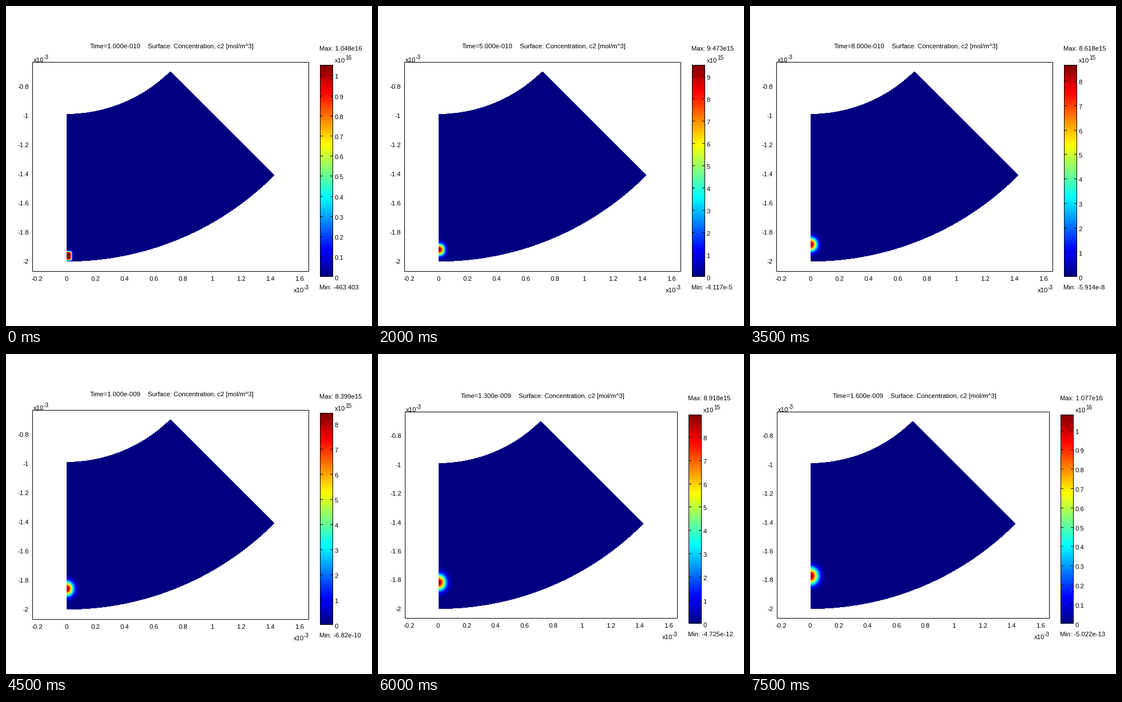
A matplotlib script that plays this animation: 640x560 px, repeating every 8 s.

```python
import math

import matplotlib.pyplot as plt
import numpy as np
from matplotlib.animation import FuncAnimation
from matplotlib.colors import LinearSegmentedColormap
from matplotlib.patches import Polygon, Rectangle

W, H, DPI = 640, 560, 80
PX = 72 / DPI  # one pixel in points
FRAMES, STEP_MS = 16, 500
SWITCH = 10  # first step that uses the smaller layout
APEX_X = 106
HALF = 128 / 255
NAVY = (0, 0, HALF)

plt.rcParams["font.family"] = "Liberation Sans"

JET = LinearSegmentedColormap.from_list("plain_jet", [
    (0, NAVY), (.125, (0, 0, 1)), (.375, (0, 1, 1)),
    (.625, (1, 1, 0)), (.875, (1, 0, 0)), (1, (HALF, 0, 0))])

# Peak concentration in units of 1e15, and the minimum as printed
PEAKS = [10.48, 10.52, 10.58, 9.962, 9.473, 9.128, 8.849, 8.618,
         8.467, 8.399, 8.456, 8.637, 8.918, 9.371, 9.984, 10.77]
LOWS = ["-463.403", "-2.7418", "-0.0153", "-6.382e-4", "-4.117e-5", "-5.263e-6",
        "-6.185e-7", "-5.914e-8", "-6.237e-9", "-6.82e-10", "-4.031e-11",
        "-1.416e-11", "-4.725e-12", "-2.138e-12", "-9.826e-13", "-5.022e-13"]

LARGE = dict(
    box=(46, 98, 529, 464), title=(147, 248, 74),
    inner=(189.4, 287.3, 115), outer=(446.7, 468.5, 296.2), scale=256,
    xtick=(54.3, 50.95, 481), ytick=(40, 145, 51),
    top_exp=(48, 98), side_exp=(503, 501),
    bar=(549, 103, 571, 473), bar_text=548, bar_exp=(575, 99), max_y=78, min_y=496,
)
SMALL = dict(
    box=(47, 101, 523, 462), title=(145, 246, 77),
    inner=(191.4, 284.3, 118), outer=(445.6, 463.4, 297.1), scale=252.4,
    xtick=(54.6, 50.35, 479), ytick=(41, 147.4, 50.4),
    top_exp=(49, 101), side_exp=(497, 499),
    bar=(543, 106, 565, 471), bar_text=542, bar_exp=(569, 102), max_y=81, min_y=494,
)

fig = plt.figure(figsize=(W / DPI, H / DPI), dpi=DPI, facecolor="white")
ax = fig.add_axes([0, 0, 1, 1])


def label(x, y, s, size=11.2, ha="left"):
    ax.text(x, y, s, fontsize=size * PX, ha=ha, va="baseline", color="black")


def power(x, y, exponent):
    label(x, y, "x10")
    label(x + 18, y - 5, str(exponent), 10)


def frame_box(x0, y0, x1, y1):
    ax.add_patch(Rectangle((x0 + .5, y0 + .5), x1 - x0, y1 - y0, fill=False,
                           ec="black", lw=PX, snap=False, zorder=3))


def heat(values, extent):
    return ax.imshow(values, cmap=JET, vmin=0, vmax=1, extent=extent,
                     interpolation="nearest", aspect="auto", zorder=2)


def arc(low_y, x, y):
    """Circle arc from the axis at low_y to the corner (x, y)."""
    dx = x - APEX_X
    cy = (low_y + y - dx ** 2 / (low_y - y)) / 2
    r = low_y - cy
    a = np.linspace(0, math.atan2(dx, y - cy), 60)
    return np.column_stack([APEX_X + r * np.sin(a), cy + r * np.cos(a)])


def smooth_box(d, half, var):
    """Box profile blurred by diffusion, 1 at its centre."""
    q = math.sqrt(2 * var)
    return np.array([math.erf((v + half) / q) - math.erf((v - half) / q)
                     for v in d]) / (2 * math.erf(half / q))


def draw_sector(lay, k):
    shape = np.vstack([arc(*lay["inner"]), arc(*lay["outer"])[::-1]])
    sector = Polygon(shape, closed=True, fc=NAVY, ec="none", antialiased=False)
    ax.add_patch(sector)

    s = lay["scale"]
    depth = .037 + .0098 * k + .00019 * k ** 2
    cy = lay["outer"][0] - depth * s
    zoom = 256 / s
    x0, x1, y0, y1 = APEX_X, 166, 330, 450
    u = (np.arange(x0, x1) + .5 - APEX_X) * zoom
    v = (np.arange(y0, y1) + .5 - cy) * zoom
    field = np.outer(smooth_box(v, 7.6, 2.5 + 5.4 * k),
                     smooth_box(u, 8.6, 2.5 + 3.7 * k))
    heat(field, (x0, x1, y1, y0)).set_clip_path(sector)


def draw_axes(lay):
    frame_box(*lay["box"])
    x, step, y = lay["xtick"]
    for i in range(10):
        label(x + i * step, y, f"{(i - 1) / 5:g}", ha="center")
    x, y, step = lay["ytick"]
    for i in range(7):
        label(x, y + i * step, f"{-(i + 4) / 5:g}", ha="right")
    power(*lay["top_exp"], -3)
    power(*lay["side_exp"], -3)


def draw_bar(lay, k):
    x0, y0, x1, y1 = lay["bar"]
    heat(np.linspace(1, 0, y1 - y0 + 1)[:, None], (x0, x1 + 1, y1 + 1, y0))
    frame_box(x0, y0, x1, y1)

    peak = PEAKS[k]
    unit = 1 if peak < 10 else 10
    span = y1 - y0 - 1
    for i in range(int(peak) + 1):
        y = y1 + 1 - span * i / peak
        ty = math.floor(y) + .5
        if i:
            for a, b in ((x0, x0 + 5), (x1 - 4, x1 + 1)):
                ax.plot([a, b], [ty, ty], color="black", lw=PX, snap=False,
                        solid_capstyle="butt", zorder=3)
        label(x1 + 3.5, y + 5.5, f"{i / unit:g}")
    power(*lay["bar_exp"], 15 if unit == 1 else 16)
    label(lay["bar_text"], lay["max_y"], "Max: " + f"{peak * 1e15:.3e}".replace("+", ""))
    label(lay["bar_text"], lay["min_y"], "Min: " + LOWS[k])


def draw(k):
    ax.clear()
    lay = LARGE if k < SWITCH else SMALL
    draw_sector(lay, k)
    draw_axes(lay)
    draw_bar(lay, k)

    n = k + 1
    time = f"{n:.3f}e-010" if n < 10 else f"{n / 10:.3f}e-009"
    x, x2, y = lay["title"]
    label(x, y, "Time=" + time)
    label(x2, y, "Surface: Concentration, c2 [mol/m^3]", 11.25)

    ax.set(xlim=(0, W), ylim=(H, 0))
    ax.axis("off")
    return []


anim = FuncAnimation(fig, draw, frames=FRAMES, interval=STEP_MS,
                     init_func=lambda: draw(0), repeat=True, repeat_delay=0)
plt.show()
```
